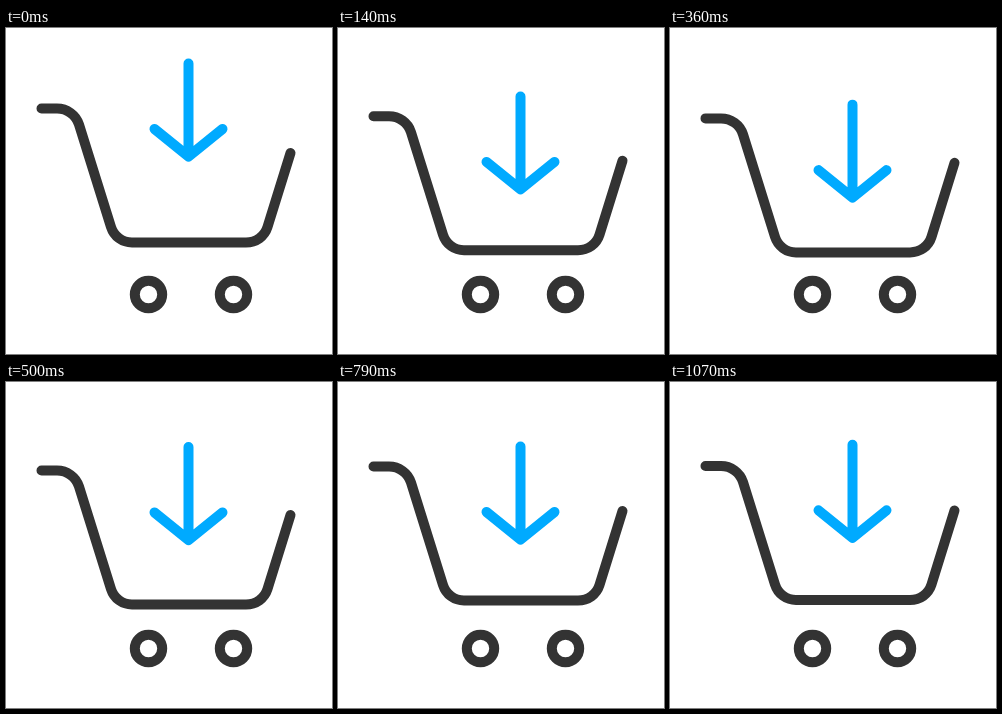
These frames come from a looping animation (326x326 px, 1.57 s). An HTML page:

```html
<!DOCTYPE html>
<html lang="en">
<head>
<meta charset="utf-8">
<title>Add to cart</title>
<style>
  html, body { margin: 0; width: 100%; height: 100%; overflow: hidden; background: #fff; }
  svg { display: block; width: 100vw; height: 100vh; }
  path, circle { fill: none; stroke: #333; stroke-width: 10; stroke-linecap: round; stroke-linejoin: round; }
  #arrow path { stroke: #0af; }
</style>
</head>
<body>
<svg viewBox="0 0 326 326">
  <circle cx="142.5" cy="266.5" r="13.7"/>
  <circle cx="227.5" cy="266.5" r="13.7"/>
  <g id="cart">
    <path d="M35.5 80.5H51C61 80.5 70 87 73 96.5L105 199C108 208.5 116.500 214.500 126 214.500H240C250 214.500 258.500 208.500 261.500 199L284.500 125"/>
  </g>
  <g id="arrow">
    <path d="M182.500 35.500V128M148.500 101L182.500 128.500L216.500 101"/>
  </g>
</svg>
<script>
  const LOOP = 1570;
  const frameTimes = [0, 70, 140, 210, 290, 360, 430, 500, 570, 640, 710, 790, 860, 930, 1000, 1070];

  const easeOut = p => 1 - (1 - p) ** 2;
  const easeInOut = p => (1 - Math.cos(Math.PI * p)) / 2;

  // Vertical offsets; each ease leads into its own key.
  const keys = [
    { t: 0, arrow: 0, cart: 0 },
    { t: 290, arrow: 45, cart: 10.5, ease: easeOut },
    { t: 500, arrow: 29.5, cart: 8, ease: easeInOut },
    { t: 640, arrow: 41, cart: 13, ease: easeInOut },
    { t: 790, arrow: 29, cart: 4, ease: easeInOut },
    { t: 1070, arrow: 27.3, cart: 3.5, ease: easeOut }
  ];

  const arrow = document.getElementById("arrow");
  const cart = document.getElementById("cart");

  function offset(part, t) {
    const i = Math.max(1, keys.findIndex(k => k.t >= t));
    const a = keys[i - 1], b = keys[i];
    return a[part] + (b[part] - a[part]) * b.ease((t - a.t) / (b.t - a.t));
  }

  function draw(now) {
    const time = now % LOOP;
    const t = frameTimes.filter(f => f <= time).pop();
    arrow.setAttribute("transform", `translate(0 ${offset("arrow", t)})`);
    cart.setAttribute("transform", `translate(0 ${offset("cart", t)})`);
  }

  const start = performance.now();
  function tick() {
    draw(performance.now() - start);
    requestAnimationFrame(tick);
  }
  tick();
</script>
</body>
</html>
```
